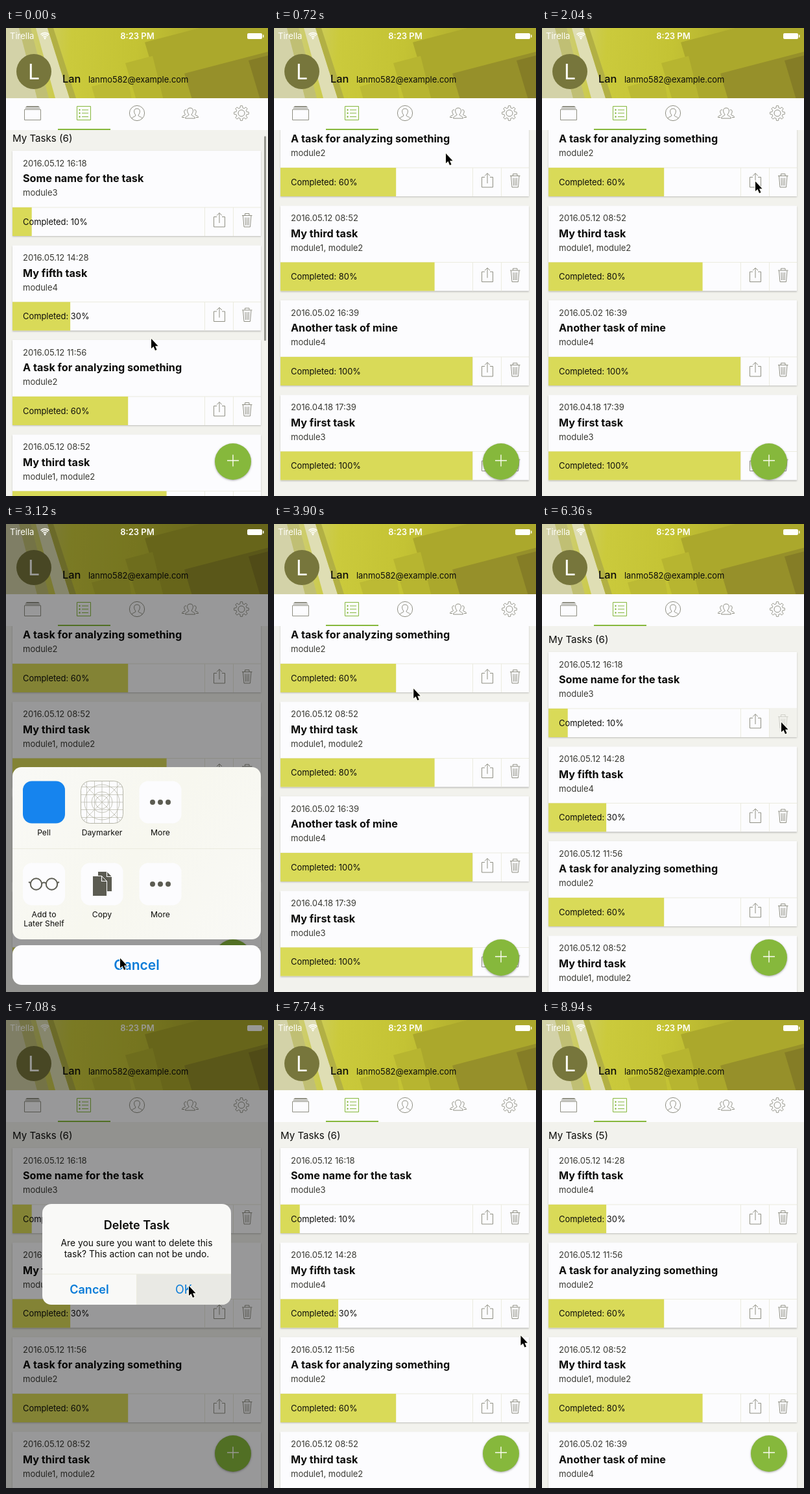
An HTML page with a canvas that plays this animation: 404x720 px, repeating every 9000 ms.

```html
<!DOCTYPE html>
<html lang="en">
<head>
<meta charset="utf-8">
<title>My Tasks</title>
<style>
html, body { margin: 0; width: 100%; height: 100%; overflow: hidden; background: #f2f2ed; }
canvas { display: block; width: 404px; height: 720px; }
</style>
</head>
<body>
<canvas id="stage"></canvas>
<script>
const W = 404, H = 720, LOOP = 9000, STEP = 60;
const canvas = document.getElementById('stage');
const ctx = canvas.getContext('2d');
const ratio = window.devicePixelRatio || 1;
canvas.width = W * ratio;
canvas.height = H * ratio;

const FONT = 'Inter, Roboto, sans-serif';
const WHITE = '#fcfcfe', BACK = '#f2f2ed', LINE = '#ebebdf', BAR = '#d9da58';
const GREEN = '#86b83c', ICON = '#8f8f83', INK = '#0c0c0a', SOFT = '#3a3a34', BLUE = '#087bd8';
const PITCH = 145.5, MAX_SCROLL = 360;

const tasks = [
  ['2016.05.12 16:18', 'Some name for the task', 'module3', 10],
  ['2016.05.12 14:28', 'My fifth task', 'module4', 30],
  ['2016.05.12 11:56', 'A task for analyzing something', 'module2', 60],
  ['2016.05.12 08:52', 'My third task', 'module1, module2', 80],
  ['2016.05.02 16:39', 'Another task of mine', 'module4', 100],
  ['2016.04.18 17:39', 'My first task', 'module3', 100]
];

// Keys are [time, value, ...]
const scrollKeys = [[0, 8], [420, 360], [3950, 360], [4740, -55], [4860, -58], [5340, 0]];
const pointerKeys = [
  [0, 224, 478], [420, 265, 193], [1000, 265, 193], [1600, 329, 236], [2050, 329, 236],
  [2850, 176, 668], [3250, 176, 668], [3850, 215, 250], [4740, 237, 615], [4920, 238, 622],
  [6100, 369, 305], [6440, 369, 305], [6980, 282, 409], [7300, 282, 409], [8000, 425, 520]
];
const barKeys = [[0, 1], [420, 1], [640, 0], [3950, 0], [4070, 1], [5340, 1], [5600, 0]];
const sheetKeys = [[2080, 0], [2480, 1], [3270, 1], [3650, 0]];
const alertKeys = [[6480, 0], [6780, 1], [7260, 1], [7560, 0]];
const DELETE_AT = 7800;

const between = (t, a, b) => t >= a && t < b;

function track(t, keys) {
  if (t <= keys[0][0]) return keys[0].slice(1);
  for (let i = 1; i < keys.length; i++) {
    const a = keys[i - 1], b = keys[i];
    if (t < b[0]) {
      const p = (t - a[0]) / (b[0] - a[0]), e = p * p * (3 - 2 * p);
      return a.slice(1).map((v, k) => v + (b[k + 1] - v) * e);
    }
  }
  return keys[keys.length - 1].slice(1);
}

function text(str, x, y, size, color = INK, weight = 400, align = 'left') {
  ctx.font = `${weight} ${size}px ${FONT}`;
  ctx.textAlign = align;
  ctx.fillStyle = color;
  ctx.fillText(str, x, y);
}

function rect(x, y, w, h, color) {
  ctx.fillStyle = color;
  ctx.fillRect(x, y, w, h);
}

function round(x, y, w, h, r, color) {
  ctx.beginPath();
  ctx.roundRect(x, y, w, h, r);
  ctx.fillStyle = color;
  ctx.fill();
}

function disc(x, y, r, color) {
  ctx.beginPath();
  ctx.arc(x, y, r, 0, Math.PI * 2);
  ctx.fillStyle = color;
  ctx.fill();
}

function fill(d, color) {
  ctx.fillStyle = color;
  ctx.fill(new Path2D(d));
}

function stroke(d, color = ICON, width = 1) {
  ctx.strokeStyle = color;
  ctx.lineWidth = width;
  ctx.stroke(new Path2D(d));
}

function ring(x, y, r, color = ICON, width = 1) {
  ctx.beginPath();
  ctx.arc(x, y, r, 0, Math.PI * 2);
  ctx.strokeStyle = color;
  ctx.lineWidth = width;
  ctx.stroke();
}

function at(x, y, draw) {
  ctx.save();
  ctx.translate(x, y);
  draw();
  ctx.restore();
}

function gradient(x1, y1, x2, y2, ...colors) {
  const g = ctx.createLinearGradient(x1, y1, x2, y2);
  colors.forEach((c, i) => g.addColorStop(i / (colors.length - 1), c));
  return g;
}

function shadow(blur, y, color) {
  ctx.shadowBlur = blur * ratio;
  ctx.shadowOffsetY = y * ratio;
  ctx.shadowColor = color;
}

function dim(amount) {
  rect(0, 0, W, H, `rgba(0,0,0,${.4 * amount})`);
}

// A slab has a steep left side and a top edge that rises to the right.
function slab(x, y, width, color) {
  const drop = 108 - y;
  fill(`M${x} ${y}L${x + width} ${y - width * .26}L${x + width + drop * .3} 108H${x + drop * .3}Z`, color);
}

function header() {
  rect(0, 0, W, 108, gradient(0, 0, W, 40, '#cfcf94', '#cbca3c', '#c4c334', '#b0ad2e', '#98922a'));
  fill('M0 0H20L48 108H0Z', '#d3d2a8');
  fill('M20 0H38L66 108H48Z', '#c0bf74');
  fill('M46 0H64L98 108H76Z', '#dfdeb4');
  fill('M64 0H73L108 108H98Z', '#b2b044');
  ctx.save();
  ctx.beginPath();
  ctx.rect(0, 0, W, 108);
  ctx.clip();
  slab(214, 22, 190, '#aba82c');
  slab(184, 54, 42, '#b7b530');
  slab(132, 90, 56, '#bcba34');
  slab(275, 70, 130, '#96902a');
  slab(374, 50, 40, '#857d26');
  ctx.restore();
  disc(43, 67, 27, '#77763c');
  text('L', 43, 78.5, 32, '#fffffa', 400, 'center');
  text('Lan', 87, 83.5, 16.4, INK, 500);
  text('lanmo582@example.com', 127, 83.5, 12.9);
}

function statusBar() {
  const c = '#fffffa';
  text('Tirella', 6, 17, 13, c);
  for (const r of [3.5, 6.5, 9.2]) {
    ctx.beginPath();
    ctx.arc(60, 16.5, r, -Math.PI * .75, -Math.PI * .25);
    ctx.strokeStyle = c;
    ctx.lineWidth = 1.7;
    ctx.stroke();
  }
  disc(60, 16, 1.4, c);
  text('8:23 PM', 202.5, 17, 13, c, 600, 'center');
  round(372, 8, 23, 9, 2, c);
  rect(396, 10.5, 1.5, 4, c);
}

function gear(x, y) {
  ctx.beginPath();
  for (let i = 0; i <= 96; i++) {
    const a = i / 96 * Math.PI * 2;
    const r = 9.8 + 1.6 * Math.max(-1, Math.min(1, 2 * Math.cos(a * 8)));
    ctx.lineTo(x + r * Math.cos(a), y + r * Math.sin(a));
  }
  ctx.strokeStyle = ICON;
  ctx.lineWidth = 1;
  ctx.stroke();
  ring(x, y, 5);
}

function tabs() {
  rect(0, 108, W, 49, WHITE);
  stroke('M28.5 125.5H53.5V141.5H28.5ZM29.5 123.5H52.5M30.5 121.5H51.5M31.5 120.5H50.5');
  stroke('M109.5 120.5H130.5V141.5H109.5ZM117 126H127M117 131H127M117 136.5H127', GREEN);
  for (const y of [126, 131, 136.5]) disc(113.5, y, 1.2, GREEN);
  ring(202, 131, 11.6);
  stroke('M194 139C195 136 200 137 200 134C197 131 196 124 202 124C208 124 207 131 204 134C204 137 209 136 210 139');
  stroke('M276.500 139C276.500 135 282 136 282 133C279 130 278 123 284 123C290 123 289 130 286 133C286 136 291.500 135 291.500 139Z');
  stroke('M275 137.500H271.500C271.500 134 276.500 135 276.500 133C274 130 274 125 278 126M293 137.500H296.500C296.500 134 291.500 135 291.500 133C294 130 294 125 290 126');
  gear(363, 131);
  rect(80, 155, 81, 2, GREEN);
}

function shareIcon() {
  stroke('M325 101.500H320.500V117H337.500V101.500H333M329 111V95.500M325 99.500L329 95.500L333 99.500');
}

function trashIcon() {
  stroke('M364 99.500H379.500M368.500 99V96.500H375V99M365.500 100L367 117H376.500L378 100M369 102.500L369.500 114.500M371.800 102.500V114.500M374.500 102.500L374 114.500');
}

function cell(x, w, icon, pressed) {
  if (pressed) rect(x, 87, w, 44, BACK);
  ctx.globalAlpha = pressed ? .35 : 1;
  icon();
  ctx.globalAlpha = 1;
}

function card([date, title, module, done], y, shareDown, trashDown) {
  at(0, y, () => {
    ctx.save();
    shadow(2, 1, 'rgba(0,0,0,.22)');
    rect(10, 0, 383, 131, WHITE);
    ctx.restore();
    text(date, 26, 23.5, 13.1, SOFT);
    text(title, 26, 48, 16.2, INK, 700);
    text(module, 26, 69, 13, SOFT);
    rect(10, 86.5, 383, 1, LINE);
    rect(10, 87, 297 * done / 100, 44, BAR);
    text(`Completed: ${done}%`, 26, 113.5, 12.9);
    cell(307, 43, shareIcon, shareDown);
    cell(351, 42, trashIcon, trashDown);
    rect(306, 87, 1, 44, LINE);
    rect(350, 87, 1, 44, LINE);
  });
}

function list(t, scroll) {
  const items = t < DELETE_AT ? tasks : tasks.slice(1);
  ctx.save();
  ctx.beginPath();
  ctx.rect(0, 157, W, H - 157);
  ctx.clip();
  text(`My Tasks (${items.length})`, 10, 182.5 - scroll, 15.1);
  items.forEach((task, i) => card(task, 197 + i * PITCH - scroll,
    i === 2 && between(t, 1860, 2040), i === 0 && between(t, 6300, 6480)));

  const over = Math.max(0, -scroll);
  const top = 161 + 239 * Math.max(0, scroll) / MAX_SCROLL;
  ctx.globalAlpha = track(t, barKeys)[0];
  round(398, top, 3, 315 - over, 1.5, '#96968e');
  ctx.restore();
}

function addButton() {
  ctx.save();
  shadow(3, 1, 'rgba(0,0,0,.35)');
  disc(350, 667, 28, GREEN);
  ctx.restore();
  stroke('M341 665.500H359M350 656.500V674.500', '#fdfdf4', 1.4);
}

function templateIcon(x, y) {
  const c = '#b6b6a8', m = 32.5;
  ctx.save();
  ctx.beginPath();
  ctx.roundRect(x, y, 65, 65, 14);
  ctx.fillStyle = WHITE;
  ctx.fill();
  ctx.clip();
  at(x, y, () => {
    for (const p of [9, 21, 32.5, 44, 56]) stroke(`M${p} 0V65M0 ${p}H65`, c, .7);
    stroke('M0 0L65 65M65 0L0 65', c, .7);
    for (const r of [10, 16, 27]) ring(m, m, r, c, .8);
  });
  ctx.restore();
  ctx.beginPath();
  ctx.roundRect(x, y, 65, 65, 14);
  ctx.strokeStyle = c;
  ctx.lineWidth = 1;
  ctx.stroke();
}

function moreIcon(x, y) {
  round(x, y, 65, 65, 14, WHITE);
  for (const dx of [20.5, 32.5, 44.5]) disc(x + dx, y + 32.5, 4, '#5c5c52');
}

function glassesIcon(x, y) {
  round(x, y, 65, 65, 14, WHITE);
  at(x + 32.5, y + 32.5, () => {
    const c = '#5c5c52';
    ring(-12, 0, 8.7, c, 2);
    ring(12, 0, 8.7, c, 2);
    stroke('M-3.500 -1Q0 -4 3.500 -1M-20.500 -2L-23.500 -3M20.500 -2L23.500 -3', c, 2);
  });
}

function copyIcon(x, y) {
  round(x, y, 65, 65, 14, WHITE);
  at(x, y, () => {
    const page = 'M0 0H14L22 8V31H0Z';
    for (const [px, py] of [[26, 13], [18, 20]]) {
      at(px, py, () => {
        fill(page, '#5c5c52');
        stroke(page, WHITE, 1);
        stroke('M14 0V8H22', WHITE, 1.2);
      });
    }
  });
}

function sheet(open) {
  const label = (str, x, y) => text(str, x, y, 12.2, INK, 400, 'center');
  at(0, (1 - open) * 350, () => {
    round(10, 374, 383, 265, 14, gradient(10, 374, 393, 639, '#f9f9f6', '#f7f7ef', '#f9f9f6'));
    rect(10, 499, 383, 1, LINE);
    round(26, 395.5, 65, 65, 14, '#1684ee');
    templateIcon(115.5, 395.5);
    moreIcon(205.5, 395.5);
    glassesIcon(26, 521.5);
    copyIcon(115.5, 521.5);
    moreIcon(205.5, 521.5);
    label('Pell', 58.5, 479);
    label('Daymarker', 148, 479);
    label('More', 238, 479);
    label('Add to', 58.5, 605);
    label('Later Shelf', 58.5, 619);
    label('Copy', 148, 605);
    label('More', 238, 605);
    round(10, 648, 383, 61, 14, WHITE);
    text('Cancel', 201.5, 686, 21, BLUE, 600, 'center');
  });
}

function dialog(open, closing, okDown) {
  const scale = closing ? 1 : 1.2 - .2 * open;
  ctx.save();
  ctx.globalAlpha = open;
  ctx.translate(201.5, 360.5);
  ctx.scale(scale, scale);
  ctx.translate(-201.5, -360.5);
  round(56, 283, 291, 155, 14, '#f9f9f7');
  if (okDown) round(202, 391, 145, 47, [0, 0, 14, 0], '#e9e9e4');
  rect(56, 390.5, 291, 1, LINE);
  rect(201, 391, 1, 47, LINE);
  text('Delete Task', 201.5, 321.5, 18, INK, 600, 'center');
  text('Are you sure you want to delete this', 201.5, 347.5, 13.8, INK, 400, 'center');
  text('task? This action can not be undo.', 201.5, 364.5, 13.8, INK, 400, 'center');
  text('Cancel', 128.5, 421, 18, BLUE, 600, 'center');
  text('OK', 274, 421, 18, BLUE, 400, 'center');
  ctx.restore();
}

function pointer([x, y]) {
  at(x, y, () => {
    const arrow = 'M0 0V15L3.500 12L6 18L8.500 17L6 11.200H10.500Z';
    stroke(arrow, '#fdfdf4', 2);
    fill(arrow, '#000');
  });
}

function draw(t) {
  ctx.setTransform(ratio, 0, 0, ratio, 0, 0);
  rect(0, 0, W, H, BACK);
  list(t, track(t, scrollKeys)[0]);
  header();
  tabs();
  addButton();

  const sheetOpen = track(t, sheetKeys)[0];
  if (sheetOpen) {
    dim(sheetOpen);
    sheet(sheetOpen);
  }
  statusBar();

  const alertOpen = track(t, alertKeys)[0];
  if (alertOpen) {
    dim(alertOpen);
    dialog(alertOpen, t > 7200, between(t, 6990, 7240));
  }
  pointer(track(t, pointerKeys));
}

const start = performance.now();
function frame() {
  const t = (performance.now() - start) % LOOP;
  draw(Math.floor(t / STEP) * STEP);
  requestAnimationFrame(frame);
}
frame();
</script>
</body>
</html>
```
